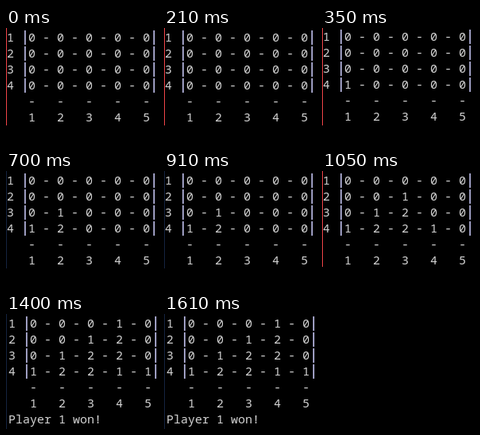
Write an HTML page with a canvas that moves like this. It is 191 by 144 pixels and loops after 1750 ms.

```html
<!DOCTYPE html>
<html lang="en">
<head>
<meta charset="utf-8">
<title>Console board game</title>
<style>
html, body { margin: 0; width: 100%; height: 100%; overflow: hidden; background: #000; }
canvas { display: block; }
</style>
</head>
<body>
<canvas id="stage" width="191" height="144"></canvas>
<script>
const ctx = document.getElementById("stage").getContext("2d");
const STEP = 350;
const LINE = 20;
const RED = "#f04448";
const NAVY = "#14233f";

// Each state: board rows, text origin, window edge and its height, optional message.
const states = [
  { rows: ["00000", "00000", "00000", "00000"], x: 1, y: 17, edge: RED, h: 122 },
  { rows: ["00000", "00000", "00000", "10000"], x: 1, y: 16, edge: RED, h: 122 },
  { rows: ["00000", "00000", "01000", "12000"], x: 1, y: 17, edge: NAVY, h: 122 },
  { rows: ["00000", "00100", "01200", "12210"], x: 1, y: 17, edge: RED, h: 120 },
  { rows: ["00010", "00120", "01220", "12211"], x: 3, y: 17, edge: NAVY, h: 144,
    message: "Player 1 won!" }
];

function rect(color, x, y, w, h) {
  ctx.fillStyle = color;
  ctx.fillRect(x, y, w, h);
}

function text(line, x, y) {
  ctx.fillStyle = "#d4d4d4";
  ctx.fillText(line, x, y);
}

function draw({ rows, x, y, edge, h, message = "" }) {
  rect("#000", 0, 0, 191, 144);
  rect(edge, 0, 0, 1, h);
  ctx.font = '15px "Noto Sans Mono", monospace';

  rows.forEach((row, i) => {
    const base = y + i * LINE;
    text(`${i + 1}  ${[...row].join(" - ")}`, x, base);
    for (const bar of [22, 184]) rect("#9c9cc0", x + bar, base - 14, 2, 18);
  });

  const footer = ["   -   -   -   -   -", "   1   2   3   4   5", message];
  footer.forEach((line, i) => text(line, x, y + (rows.length + i) * LINE));
}

const start = performance.now();

function tick() {
  const elapsed = Math.max(0, performance.now() - start);
  draw(states[Math.floor(elapsed / STEP) % states.length]);
  requestAnimationFrame(tick);
}

tick();
</script>
</body>
</html>
```
